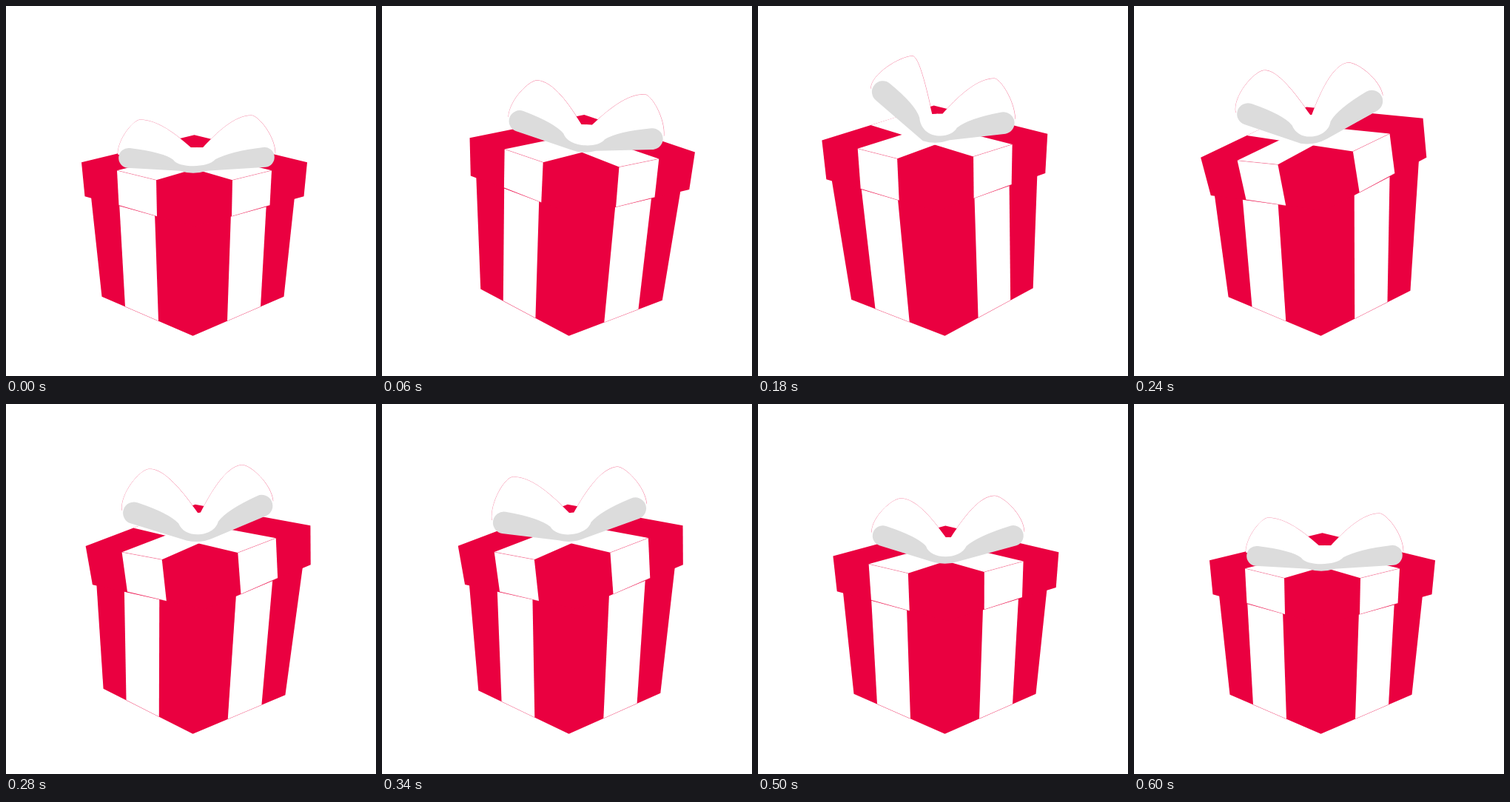
Write an HTML page with a canvas that moves like this. It is 500 px wide and 500 px high and loops after 1.18 s.

```html
<!DOCTYPE html>
<html lang="en">
<head>
<meta charset="utf-8">
<title>Gift box</title>
<style>
html, body { margin: 0; width: 100%; height: 100%; overflow: hidden; background: #fff; }
canvas { display: block; }
</style>
</head>
<body>
<canvas id="stage" width="500" height="500"></canvas>
<script>
const ctx = document.getElementById('stage').getContext('2d');
const LOOP = 1180, STEP = 20, END = 600, RAD = Math.PI / 180;
const RED = '#ea0040', GREY = '#dcdcdc', WHITE = '#fff';

// Whole box rocks about its bottom corner: degrees, every 100 ms
const SWAY = [0, 6, -6, 4, -4, 0, 0].map((deg, i) => [i * 100, deg]);

// time, lift of the lid (0 to 1), lid tilt, left and right bow loop (degrees)
const POSES = [
  [0, 0, 0, 7, 7],
  [100, 1, 0, 24, 10],
  [180, .86, 2, 41, 9],
  [240, .83, -8, 29, 21],
  [340, .83, -6, 15, 17],
  [440, .44, -2.5, 26, 21],
  [540, .05, 0, 15, 13],
  [600, 0, 0, 7, 7]
];

function sample(rows, t) {
  const i = Math.max(1, rows.findIndex(row => row[0] >= t));
  const a = rows[i - 1], b = rows[i], k = (t - a[0]) / (b[0] - a[0]);
  return a.slice(1).map((v, j) => v + (b[j + 1] - v) * k);
}

function trace(points) {
  ctx.beginPath();
  points.forEach(p => ctx.lineTo(...p));
}

function poly(color, ...points) {
  trace(points);
  ctx.fillStyle = color;
  ctx.fill();
}

function seam(...points) {
  trace(points);
  ctx.stroke();
}

// Draws with a vertical stretch
function stretched(sy, paint) {
  ctx.save();
  ctx.scale(1, sy);
  paint();
  ctx.restore();
}

function drawBody() {
  poly(RED, [0, 0], [-123, -53], [-141.5, -225], [141.5, -225], [123, -53]);
  for (const m of [-1, 1]) {
    const outer = [m * 91.5, -39.5], inner = [m * 46.5, -20];
    poly(WHITE, outer, inner, [m * 53.5, -225], [m * 102, -225]);
    seam(outer, inner);
  }
}

function drawLid() {
  poly(RED, [-152.5, 0], [0, -37], [152.5, 0], [148, 46], [0, 87], [-148, 46]);
  for (const m of [-1, 1]) {
    const a = [m * 104.5, 11], b = [m * 51.5, 24];
    const c = [m * 50.5, 73], d = [m * 102, 58];
    poly(WHITE, a, b, [-m * 86, -16], [-m * 46, -26]);
    poly(WHITE, a, b, c, d);
    seam(a, b);
    seam(c, d);
  }
}

function loopEdge([vx, vy], [ax, ay], [ex, ey]) {
  const dx = ax - vx, dy = ay - vy;
  ctx.moveTo(vx, vy);
  ctx.bezierCurveTo(vx + dx * .28, vy + dy * .45, ax - dx * .35, ay, ax, ay);
  ctx.bezierCurveTo(ax + (ex - ax) * .3, ay, ex, ey - (ey - ay) * .45, ex, ey);
}

function drawBow(lift, leftDeg, rightDeg) {
  const r = 13.5 + 1.5 * lift, w = Math.max(1, 11.5 - rightDeg / 2);
  const kx = -1.5 + 4 * lift, ky = 5 - 8 * lift;
  const vx = kx + 5 - 3 * lift, vy = ky - 25 - 5 * lift;

  // Both loops swing about the knot
  const loop = (m, deg, reach, height) => {
    const polar = (d, len) => [kx + m * len * Math.cos(d * RAD), ky - len * Math.sin(d * RAD)];
    const [x, y] = polar(deg, reach), a = Math.atan2(ky - y, kx - x);
    const ux = Math.cos(a), uy = Math.sin(a);
    const rim = [x - m * uy * r, y + m * ux * r];
    return {
      m, x, y, a, rim,
      top: polar(deg + 34, height),
      bend: [rim[0] + ux * 45, rim[1] + uy * 45],
      inner: [kx + (x - kx) * .31, ky + (y - ky) * .33 - 5]
    };
  };
  const left = loop(-1, leftDeg, 88 + 6 * lift, 95 + 20 * lift);
  const right = loop(1, rightDeg, 97 - 5 * lift, 104 + 7 * lift);
  const L = left.inner, R = right.inner;

  ctx.lineWidth = .8;
  for (const {m, x, y, top} of [left, right]) {
    ctx.beginPath();
    loopEdge([vx + m * w, vy], top, [x + m * (r + 1), y - 5]);
    ctx.stroke();
    ctx.lineTo(x, y);
    ctx.lineTo(kx, ky + 8);
    ctx.lineTo(vx - m, vy);
    ctx.fillStyle = WHITE;
    ctx.fill();
  }
  poly(WHITE, [vx - w, vy], [vx + w, vy], R, [kx, ky], L);

  // Underside: rounded ends and the band below the knot
  const cap = ({x, y, a}) => ctx.arc(x, y, r, a - Math.PI / 2, a + Math.PI / 2, true);
  const sag = ky + (2 * ky - L[1] - R[1]) / 6;
  ctx.beginPath();
  ctx.moveTo(...L);
  ctx.quadraticCurveTo(...left.bend, ...left.rim);
  cap(left);
  ctx.lineTo(kx - 18, ky + 6.5);
  ctx.quadraticCurveTo(kx, ky + 12.5, kx + 18, ky + 6.5);
  cap(right);
  ctx.quadraticCurveTo(...right.bend, ...R);
  ctx.bezierCurveTo(kx + 20, sag, kx - 20, sag, ...L);
  ctx.fillStyle = GREY;
  ctx.fill();
}

function draw(t) {
  const [lift, tilt, leftDeg, rightDeg] = sample(POSES, t);
  ctx.fillStyle = WHITE;
  ctx.fillRect(0, 0, 500, 500);
  ctx.strokeStyle = 'rgba(234, 0, 64, .6)';
  ctx.lineWidth = .4;
  ctx.save();
  ctx.translate(252.5, 445.7);
  ctx.rotate(sample(SWAY, t)[0] * RAD);
  stretched(1 + .085 * lift, drawBody);
  ctx.translate(2 + .6 * tilt, -234.5 - 40 * lift);
  ctx.rotate(tilt * RAD);
  stretched(1 + .18 * lift, drawLid);
  drawBow(lift, leftDeg, rightDeg);
  ctx.restore();
}

const origin = performance.now();
function frame() {
  const t = (performance.now() - origin) % LOOP;
  draw(Math.min(END, Math.floor(t / STEP) * STEP));
  requestAnimationFrame(frame);
}
frame();
</script>
</body>
</html>
```
